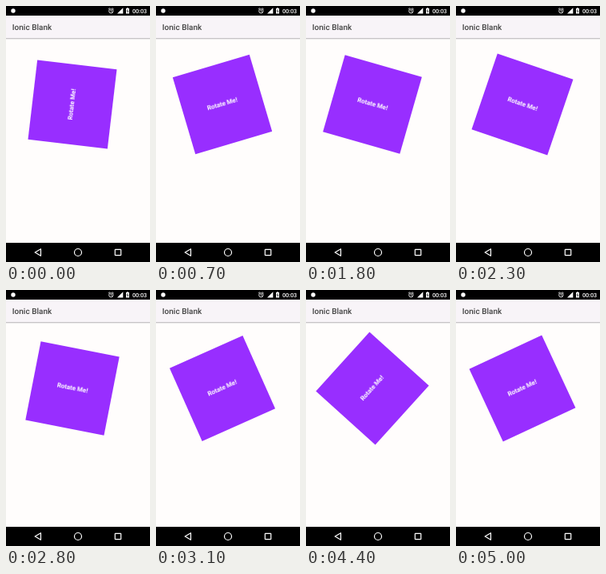
Recreate the animation shown at these times as an HTML page. Size 180 by 320 pixels, loop 5.1 s.

```html
<!DOCTYPE html>
<html lang="en">
<head>
<meta charset="utf-8">
<title>Rotate</title>
<style>
  html, body { margin: 0; width: 100%; height: 100%; overflow: hidden; background: #fffdfc; }
  svg { position: fixed; left: 0; top: 0; width: 180px; height: 320px; }
  text { font-family: Roboto, sans-serif; font-weight: 500; text-rendering: geometricPrecision; }
  #box { transform-origin: 83px 123px; }
  #box text { font-weight: 700; }
</style>
</head>
<body>
<svg viewBox="0 0 180 320">
  <defs>
    <linearGradient id="shade" x1="0" y1="0" x2="0" y2="1">
      <stop offset="0" stop-color="#b4b0b4"/>
      <stop offset="1" stop-color="#fffdfc"/>
    </linearGradient>
  </defs>
  <rect width="180" height="320" fill="#fffdfc"/>

  <!-- header -->
  <rect y="12" width="180" height="28" fill="#f8f4f8"/>
  <rect y="40" width="180" height="2" fill="url(#shade)"/>
  <text x="7.8" y="29.5" font-size="10" fill="#424242">Ionic Blank</text>

  <!-- rotating square -->
  <g id="box">
    <rect x="33" y="73" width="100" height="100" fill="#982eff"/>
    <text x="83" y="125.2" font-size="8" fill="#fff" text-anchor="middle">Rotate Me!</text>
  </g>

  <!-- status bar -->
  <rect width="180" height="12" fill="#000"/>
  <g fill="#fff">
    <circle cx="9" cy="6" r="2.7"/>
    <path d="M146.3 2.2V9.5H139Z"/>
    <path d="M150 3H151.2V2.2H152.8V3H154V9.6H150Z"/>
    <text x="176.2" y="8.6" font-size="7.2" text-anchor="end">00:03</text>
  </g>
  <path d="M152.4 4L151 6.5H153L151.8 8.6" fill="none" stroke="#000" stroke-width=".6"/>
  <g fill="none" stroke="#fff" stroke-width=".9">
    <circle cx="131.3" cy="6.3" r="2.6"/>
    <path d="M131.3 4.7V6.5L132.5 7.2M128.1 4L129.8 2.6M134.5 4L132.8 2.6"/>
  </g>

  <!-- navigation bar -->
  <rect y="296" width="180" height="24" fill="#000"/>
  <g fill="none" stroke="#fff" stroke-width="1.2" stroke-linejoin="round">
    <path d="M43.5 303.7V312.3L36.2 308Z"/>
    <circle cx="90" cy="308" r="4.5"/>
    <rect x="136.3" y="304.3" width="7.4" height="7.4" rx=".4"/>
  </g>
</svg>
<script>
  const loop = 5100, step = 100;

  // turning points of the gesture: [ms, degrees]
  const keys = [
    [0, -83.3], [500, -58.5], [600, -32.5], [700, -16.5], [1400, 24],
    [1800, 16], [2100, 16], [2600, 24], [3100, -24], [3700, -67.3],
    [3900, -72], [4500, -46], [4600, -46], [5000, -25]
  ];

  // flat at both ends and wherever the rotation reverses or rests
  function slope(i) {
    const a = keys[i - 1], b = keys[i], c = keys[i + 1];
    if (!a || !c || (b[1] - a[1]) * (c[1] - b[1]) <= 0) return 0;
    return (c[1] - a[1]) / (c[0] - a[0]);
  }

  // cubic Hermite curve through the keys
  function angleAt(t) {
    const next = keys.findIndex(k => k[0] > t);
    if (next < 0) return keys[keys.length - 1][1];
    const [t0, a0] = keys[next - 1], [t1, a1] = keys[next];
    const d = t1 - t0, u = (t - t0) / d, v = 1 - u;
    return a0 + (a1 - a0) * u * u * (3 - 2 * u)
      + d * u * v * (slope(next - 1) * v - slope(next) * u);
  }

  // held poses, ten per second
  const frames = [];
  for (let t = 0; t <= loop; t += step) {
    frames.push({
      transform: `rotate(${angleAt(t)}deg)`,
      offset: t / loop,
      easing: "steps(1, end)"
    });
  }

  document.getElementById("box").animate(frames, { duration: loop, iterations: Infinity });
</script>
</body>
</html>
```
